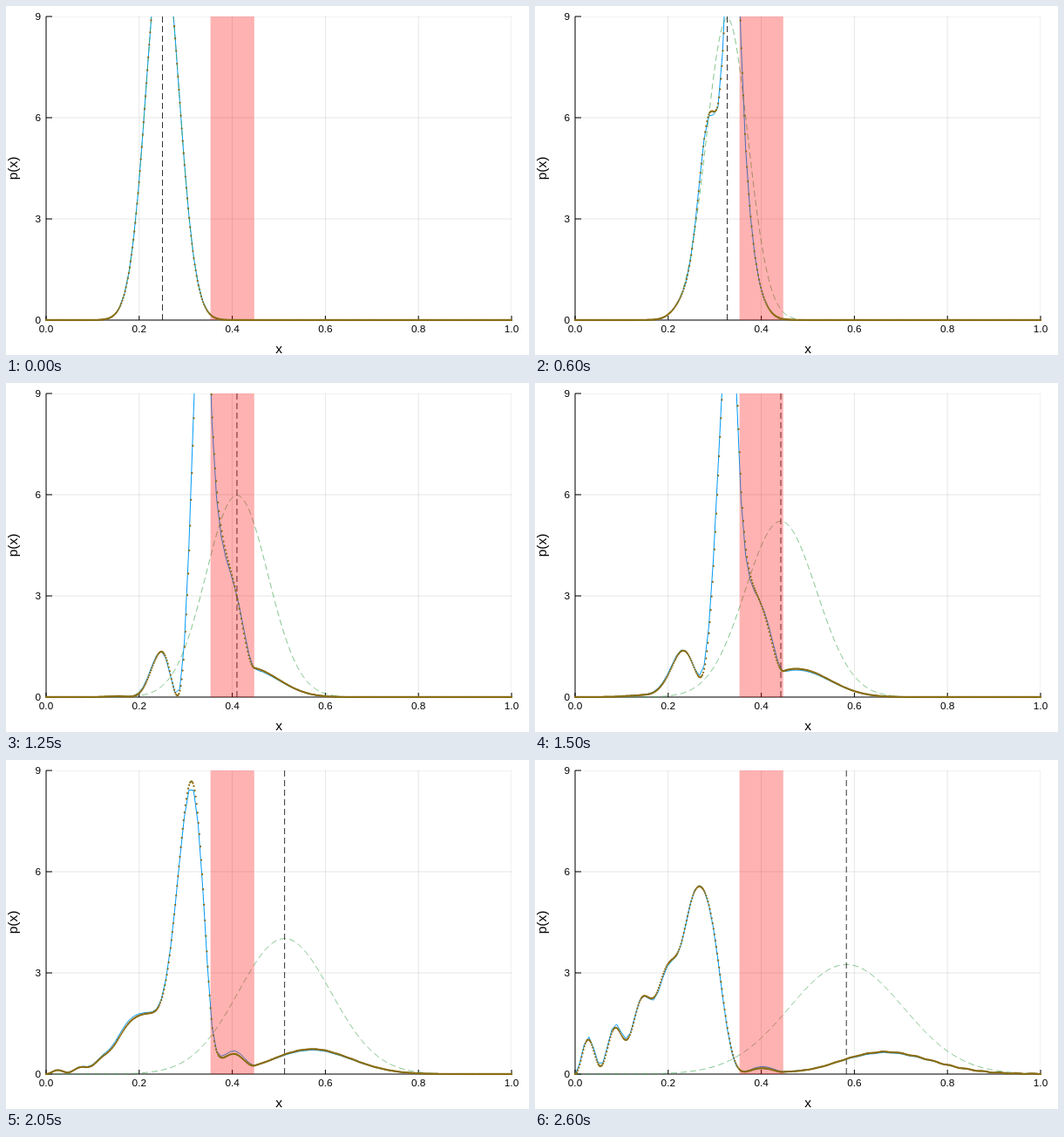
An HTML page with a canvas for the animation above (2.65 s loop, 600 by 400 pixels).

```html
<!DOCTYPE html>
<html lang="en">
<head>
<meta charset="utf-8">
<title>Wave packet at a barrier</title>
<style>
  html, body { margin: 0; width: 100%; height: 100%; overflow: hidden; background: #fff; }
  canvas { display: block; }
</style>
</head>
<body>
<canvas id="stage" width="600" height="400"></canvas>
<script>
const ctx = document.getElementById('stage').getContext('2d');
const FRAMES = 53, FRAME_MS = 50, DT = 0.00016, SUBSTEPS = 16;
const START = 0.25, SIGMA = 0.05, WAVENUMBER = 40;
const BARRIER = { from: 0.3532, to: 0.4472, height: 1275 };
const LEFT = 46, RIGHT = 580, TOP = 12, BOTTOM = 360;

const px = x => LEFT + x * (RIGHT - LEFT);
const py = p => BOTTOM - p * (BOTTOM - TOP) / 9;

// Schroedinger equation in a box, sine modes with a grid potential (split steps).
// Returns the density at every grid point for each frame.
function solve(points, modes) {
  const h = 1 / (points + 1), dt = DT / SUBSTEPS;
  const re = new Float64Array(modes), im = new Float64Array(modes);
  const sines = Array.from({ length: points + 2 }, (_, i) =>
    Float64Array.from({ length: modes }, (_, n) => Math.sin(Math.PI * (n + 1) * i * h)));
  const inside = sines.filter((_, i) => i * h > BARRIER.from && i * h < BARRIER.to);

  const addPoint = (row, a, b) => {
    for (let n = 0; n < modes; n++) {
      re[n] += 2 * h * a * row[n];
      im[n] += 2 * h * b * row[n];
    }
  };
  const valueAt = row => {
    let a = 0, b = 0;
    for (let n = 0; n < modes; n++) {
      a += re[n] * row[n];
      b += im[n] * row[n];
    }
    return [a, b];
  };

  sines.forEach((row, i) => {
    const x = i * h;
    const amp = Math.exp(-(((x - START) / SIGMA) ** 2) / 2) / Math.sqrt(SIGMA * Math.sqrt(Math.PI));
    addPoint(row, amp * Math.cos(WAVENUMBER * x), amp * Math.sin(WAVENUMBER * x));
  });

  const phase = Array.from(re, (_, n) => ((n + 1) * Math.PI) ** 2 * dt / 4);
  const cos = phase.map(Math.cos), sin = phase.map(Math.sin);
  const drift = () => {
    for (let n = 0; n < modes; n++) {
      const a = re[n], b = im[n];
      re[n] = a * cos[n] + b * sin[n];
      im[n] = b * cos[n] - a * sin[n];
    }
  };
  const kickRe = Math.cos(BARRIER.height * dt) - 1, kickIm = -Math.sin(BARRIER.height * dt);
  const kick = () => {
    const values = inside.map(valueAt);
    inside.forEach((row, i) => {
      const [a, b] = values[i];
      addPoint(row, a * kickRe - b * kickIm, a * kickIm + b * kickRe);
    });
  };

  const frames = [];
  for (let f = 0; f < FRAMES; f++) {
    frames.push(sines.map(row => {
      const [a, b] = valueAt(row);
      return a * a + b * b;
    }));
    for (let s = 0; s < SUBSTEPS; s++) { drift(); kick(); drift(); }
  }
  return frames;
}

const coarse = solve(100, 100), fine = solve(500, 160);

function line(points, color, dash = []) {
  ctx.strokeStyle = color;
  ctx.setLineDash(dash);
  ctx.beginPath();
  points.forEach(([x, y]) => ctx.lineTo(x, y));
  ctx.stroke();
}

function label(text, x, y, size, align = 'center') {
  ctx.font = `${size}px "Liberation Sans", Arial, sans-serif`;
  ctx.textAlign = align;
  ctx.textBaseline = 'middle';
  ctx.fillStyle = '#000';
  ctx.fillText(text, x, y);
}

function clipped(margin, paint) {
  ctx.save();
  ctx.beginPath();
  ctx.rect(LEFT - margin, TOP, RIGHT - LEFT + 2 * margin, BOTTOM - TOP + 1.5 * margin);
  ctx.clip();
  paint();
  ctx.restore();
}

function drawAxes() {
  const ticksX = [0, 0.2, 0.4, 0.6, 0.8, 1], ticksY = [0, 3, 6, 9];
  const grid = 'rgba(0,0,0,0.1)';
  clipped(0, () => {
    ticksX.forEach(v => line([[px(v), TOP], [px(v), BOTTOM]], grid));
    ticksY.forEach(v => line([[LEFT, py(v)], [RIGHT, py(v)]], grid));
  });
  line([[LEFT, TOP], [LEFT, BOTTOM], [RIGHT, BOTTOM]], '#000');
  ticksX.forEach(v => {
    line([[px(v), BOTTOM], [px(v), BOTTOM - 5]], '#000');
    label(v.toFixed(1), px(v), 370.5, 11.8);
  });
  ticksY.forEach(v => {
    line([[LEFT, py(v)], [LEFT + 7, py(v)]], '#000');
    label(v, 40, py(v) + 0.5, 11.8, 'right');
  });
  label('x', 313, 393.5, 15.5);
  ctx.save();
  ctx.translate(9, 186);
  ctx.rotate(-Math.PI / 2);
  label('p(x)', 0, 0, 15.5);
  ctx.restore();
}

function drawCurves(f) {
  line(coarse[f].map((p, i) => [px(i / 101), py(p)]), '#009afa');

  // Packet without the barrier
  const mean = START + WAVENUMBER * DT * f;
  const variance = SIGMA ** 2 / 2 * (1 + (DT * f / SIGMA ** 2) ** 2);
  const free = Array.from({ length: 501 }, (_, i) => {
    const x = i / 500;
    const p = Math.exp(-((x - mean) ** 2) / (2 * variance)) / Math.sqrt(2 * Math.PI * variance);
    return [px(x), py(p)];
  });
  line(free, 'rgba(61,164,77,0.65)', [7, 4]);
  line([[px(mean), BOTTOM], [px(mean), TOP]], 'rgba(0,0,0,0.8)', [7, 4]);

  ctx.fillStyle = 'rgba(255,0,0,0.3)';
  ctx.fillRect(px(BARRIER.from), TOP, px(BARRIER.to) - px(BARRIER.from), BOTTOM - TOP);

  ctx.fillStyle = '#8a6d14';
  fine[f].forEach((p, i) => {
    ctx.beginPath();
    ctx.arc(px(i / 501), py(p), 1.15, 0, 2 * Math.PI);
    ctx.fill();
  });
}

function draw(f) {
  ctx.fillStyle = '#fff';
  ctx.fillRect(0, 0, 600, 400);
  ctx.lineWidth = 1;
  drawAxes();
  clipped(1, () => drawCurves(f));
}

function tick(now) {
  draw(Math.floor(now / FRAME_MS) % FRAMES);
  requestAnimationFrame(tick);
}
tick(performance.now());
</script>
</body>
</html>
```
